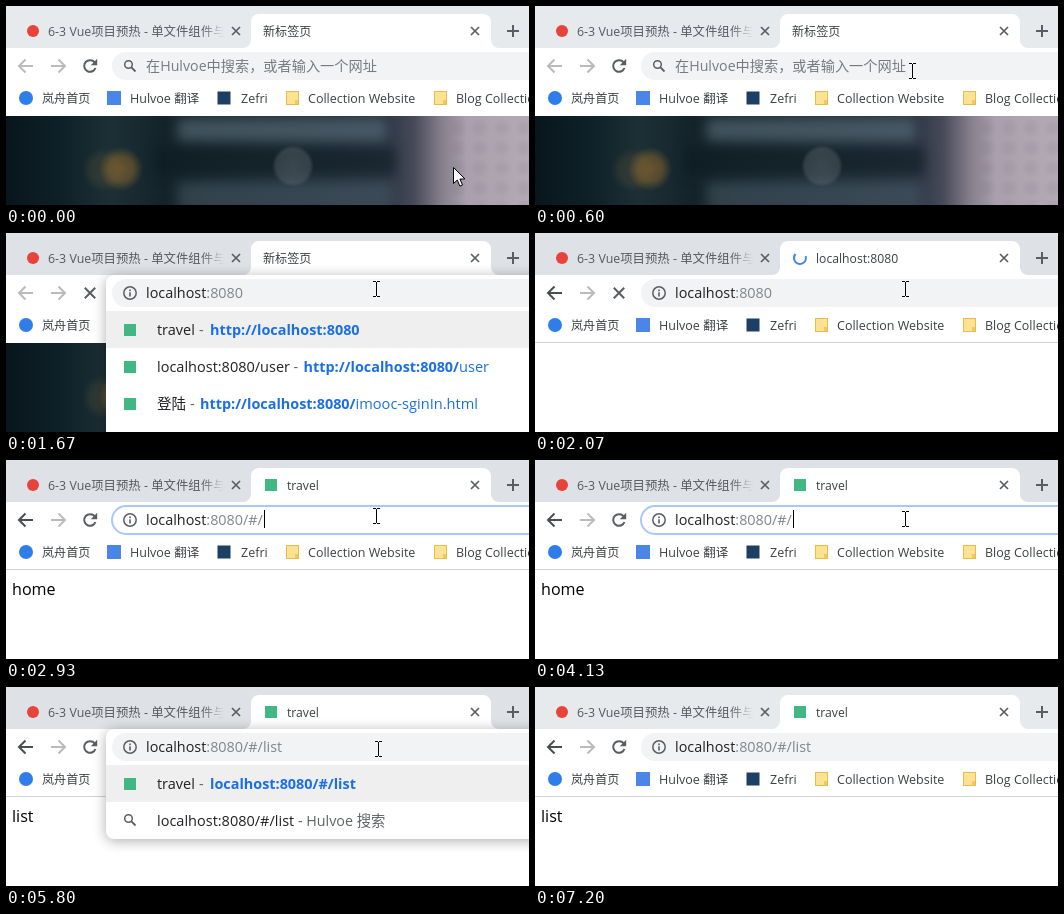
Recreate the animation shown at these times as an HTML page with a canvas. Size 523x199 px, loop 7.39 s.

```html
<!DOCTYPE html>
<html lang="zh">
<head>
<meta charset="utf-8">
<title>Browser tab</title>
<style>
html, body { margin: 0; width: 100%; height: 100%; overflow: hidden; background: #fff; }
canvas { display: block; width: 523px; height: 199px; }
</style>
</head>
<body>
<canvas id="stage"></canvas>
<script>
const W = 523, H = 199, LOOP = 7390, FPS = 15;
const FONT = '"Open Sans", "Noto Sans CJK SC", "Noto Sans CJK", sans-serif';
const INK = '#202124', GREY = '#80868b', ICON = '#5a5e63', BLUE = '#1a6fe8', GREEN = '#41b883';
const BASE = 'localhost:8080';

const canvas = document.getElementById('stage');
const g = canvas.getContext('2d');
const dpr = window.devicePixelRatio || 1;
canvas.width = W * dpr;
canvas.height = H * dpr;

function text(str, x, y, size, color, bold) {
  g.font = (bold ? 'bold ' : '') + size + 'px ' + FONT;
  g.fillStyle = color;
  g.fillText(str, x, y);
  return x + g.measureText(str).width;
}

function rect(x, y, w, h, color) {
  g.fillStyle = color;
  g.fillRect(x, y, w, h);
}

function disc(x, y, r, color) {
  g.fillStyle = color;
  g.beginPath();
  g.arc(x, y, r, 0, Math.PI * 2);
  g.fill();
}

function square(x, y, size, color) {
  rect(x - size / 2, y - size / 2, size, size, color);
}

function lines(color, width, ...paths) {
  g.strokeStyle = color;
  g.lineWidth = width;
  g.beginPath();
  for (const p of paths) {
    g.moveTo(p[0], p[1]);
    for (let i = 2; i < p.length; i += 2) g.lineTo(p[i], p[i + 1]);
  }
  g.stroke();
}

function arc(x, y, r, from, to, color, width) {
  g.strokeStyle = color;
  g.lineWidth = width;
  g.beginPath();
  g.arc(x, y, r, from, to);
  g.stroke();
}

function cross(x, y, r, width) {
  lines(ICON, width, [x - r, y - r, x + r, y + r], [x - r, y + r, x + r, y - r]);
}

function glow(x, y, r, rgb, alpha, core) {
  const grad = g.createRadialGradient(x, y, 0, x, y, r);
  grad.addColorStop(0, `rgba(${rgb},${alpha})`);
  grad.addColorStop(core, `rgba(${rgb},${alpha * 0.8})`);
  grad.addColorStop(1, `rgba(${rgb},0)`);
  g.fillStyle = grad;
  g.fillRect(x - r, y - r, 2 * r, 2 * r);
}

function arrow(x, y, dir, color) {
  lines(color, 2, [x - 7 * dir, y, x + 6 * dir, y],
    [x + 0.5 * dir, y - 6.5, x + 7 * dir, y, x + 0.5 * dir, y + 6.5]);
}

function reload(x, y) {
  arc(x, y, 5.8, 0.35, Math.PI * 1.78, ICON, 2);
  g.fillStyle = ICON;
  g.beginPath();
  g.moveTo(x + 7.2, y - 7.2);
  g.lineTo(x + 7.2, y - 0.8);
  g.lineTo(x + 0.8, y - 0.8);
  g.fill();
}

function magnifier(x, y) {
  arc(x - 1.5, y - 1.5, 3.8, 0, Math.PI * 2, ICON, 1.5);
  lines(ICON, 1.8, [x + 1.2, y + 1.2, x + 5.5, y + 5.5]);
}

function info(x, y) {
  arc(x, y, 6.2, 0, Math.PI * 2, ICON, 1.5);
  rect(x - 0.8, y - 3.5, 1.6, 1.7, ICON);
  rect(x - 0.8, y - 0.7, 1.6, 4.2, ICON);
}

function folder(x) {
  rect(x, 85, 13, 14, '#e6bd4a');
  rect(x + 1, 86, 11, 12, '#fde293');
  rect(x + 9, 94, 3, 4, '#efca62');
}

function photo() {
  g.save();
  g.beginPath();
  g.rect(0, 110, W, H - 110);
  g.clip();

  const base = g.createLinearGradient(0, 0, W, 0);
  const stops = [[0, '#08161c'], [0.1, '#0e2027'], [0.2, '#1d3036'], [0.3, '#14232a'],
    [0.38, '#1b2a32'], [0.6, '#25333e'], [0.73, '#2d3845'], [0.78, '#474a58'],
    [0.83, '#827c89'], [0.88, '#aaa0ad'], [1, '#b4aab6']];
  for (const [at, color] of stops) base.addColorStop(at, color);
  g.fillStyle = base;
  g.fillRect(0, 110, W, H - 110);

  // soft bars: light above and below a dark beam
  g.filter = `blur(${6 * dpr}px)`;
  rect(172, 113, 208, 22, 'rgba(92,110,122,.6)');
  rect(172, 176, 214, 30, 'rgba(80,98,110,.45)');
  rect(150, 142, 240, 26, 'rgba(12,24,32,.55)');
  g.filter = 'none';

  glow(98, 164, 22, '105,90,50', 0.3, 0.6);
  glow(115, 163, 22, '150,108,45', 0.6, 0.55);
  glow(287, 160, 21, '105,115,122', 0.45, 0.8);
  for (let x = 452; x < 540; x += 22)
    for (let y = 122; y < 210; y += 20) glow(x, y, 10, '105,92,112', 0.12, 0.4);
  g.restore();
}

function page(k) {
  if (k < 30) return photo();
  rect(0, 109, W, 1, '#cfd1d4');
  if (k >= 33) text(k < 87 ? 'home' : 'list', 6, 135, 16.1, '#000');
}

function tabs(k) {
  const strip = k >= 10 && k < 108 ? '#dee1e6' : '#e7eaed';
  rect(0, 0, W, 42, strip);
  g.fillStyle = '#fff';
  g.beginPath();
  g.moveTo(237, 42);
  g.arcTo(245, 42, 245, 34, 8);
  g.arcTo(245, 8, 253, 8, 8);
  g.arcTo(485, 8, 485, 16, 8);
  g.arcTo(485, 42, 493, 42, 8);
  g.lineTo(493, 42);
  g.fill();

  disc(27, 25, 6, '#e8433b');
  const fade = g.createLinearGradient(196, 0, 218, 0);
  fade.addColorStop(0, '#55595e');
  fade.addColorStop(1, strip);
  g.save();
  g.beginPath();
  g.rect(40, 10, 178, 30);
  g.clip();
  text('6-3 Vue项目预热 - 单文件组件与', 42, 29.5, 12.4, fade);
  g.restore();
  cross(230, 25, 4, 1.7);
  cross(469, 25, 4, 1.7);
  lines(ICON, 2, [501, 25, 513, 25], [507, 19, 507, 31]);

  if (k < 26) {
    text('新标签页', 257, 29.5, 12.1, '#3c4043');
  } else if (k < 35) {
    arc(265, 25, 6, k * 0.8, k * 0.8 + 4.2, '#4285f4', 2);
    text(BASE, 281, 29.5, 12.2, '#3c4043');
  } else {
    square(265, 25, 12, GREEN);
    text('travel', 281, 29.5, 12.2, '#3c4043');
  }
}

function bookmarks() {
  const label = (str, x, size) => text(str, x, 97, size, '#3c4043');
  disc(20, 92, 7, '#2f7de9');
  label('岚舟首页', 36, 12.1);
  square(108, 92, 14, '#4a86e8');
  label('Hulvoe 翻译', 124, 12.5);
  square(218, 92, 13, '#1d3f63');
  label('Zefri', 235, 12.5);
  folder(280);
  label('Collection Website', 302, 12.5);
  folder(428);
  label('Blog Collection', 450, 12.5);
}

function pill(focused) {
  g.beginPath();
  g.roundRect(106, 46, W, 28, 14);
  g.fillStyle = focused ? '#fff' : '#f1f3f4';
  g.fill();
  if (focused) {
    g.strokeStyle = '#a9c8f7';
    g.lineWidth = 2;
    g.stroke();
  }
}

// sel is a [from, to] range of characters
function address(str, plain, sel) {
  const draw = (a, b) => {
    const x = text(str.slice(0, 9), 140, 65, 14.4, a);
    text(str.slice(9), x, 65, 14.4, b);
  };
  draw(INK, plain ? INK : GREY);
  if (!sel) return;
  const [from, to] = sel.map(n => 140 + g.measureText(str.slice(0, n)).width);
  rect(from, 50, to - from, 20, '#0078d7');
  g.save();
  g.beginPath();
  g.rect(from, 50, to - from, 20);
  g.clip();
  draw('#fff', '#fff');
  g.restore();
}

function popup(bottom) {
  g.save();
  g.shadowColor = 'rgba(0,0,0,.32)';
  g.shadowBlur = 13 * dpr;
  g.shadowOffsetY = 2 * dpr;
  g.fillStyle = '#fff';
  g.beginPath();
  g.roundRect(100, 42, W, bottom - 42, 8);
  g.fill();
  g.restore();
  rect(100, 78, W, 37, '#efefef');
}

function row(y, name, dashX, linkX, bold, rest) {
  text(name, 151, y, 14.5, INK);
  text('-', dashX, y, 14.5, '#5f6368');
  const x = text(bold, linkX, y, 14.4, BLUE, true);
  if (rest) text(rest, x, y, 14.6, BLUE);
}

function hostPopup() {
  popup(230);
  for (const y of [97, 134, 171]) square(124, y, 12, GREEN);
  const link = 'http://' + BASE;
  row(102, 'travel', 193, 204, link);
  row(139, BASE + '/user', 287.5, 297.5, link + '/', 'user');
  row(176, '登陆', 184, 194, link + '/', 'imooc-sginIn.html');
}

function listPopup(typed) {
  popup(152);
  square(124, 97, 12, GREEN);
  row(102, 'travel', 193, 204, BASE + '/#/list');
  magnifier(124, 133);
  const x = text(BASE + '/#/' + typed, 151, 139, 14.5, INK);
  text(' - Hulvoe 搜索', x, 139, 14.3, '#5f6368');
}

function omnibox(k) {
  const home = BASE + '/#/', list = home + 'list';
  const caret = x => rect(x, 50, 1, 18, '#000');
  if (k < 10) {
    pill(false);
    magnifier(124, 60);
    text('在Hulvoe中搜索，或者输入一个网址', 140, 65, 14.2, '#777b80');
  } else if (k < 21) {
    pill(true);
    magnifier(124, 60);
    if (k < 18) caret(140);
  } else if (k < 26) {
    hostPopup();
    if (k === 25) pill(false);
    info(124, 60);
    address(BASE, k < 25, k < 25 && [k - 20, BASE.length]);
  } else if (k < 44) {
    pill(false);
    info(124, 60);
    address(k < 33 ? BASE : home);
  } else if (k < 75) {
    pill(true);
    info(124, 60);
    const sel = k < 46 ? null : k < 51 ? [0, 17] : k < 62 ? [14, 17] : null;
    address(home, false, sel);
    if (k < 46 || (k >= 62 && k < 71)) caret(258);
  } else if (k < 88) {
    const n = k < 77 ? 1 : k < 78 ? 2 : k < 81 ? 3 : 4;
    listPopup('list'.slice(0, n));
    if (k >= 85) pill(false);
    info(124, 60);
    address(list, k < 85, n < 4 && [17 + n, 21]);
    if (n === 4 && k < 85) caret(276);
  } else {
    pill(k < 89);
    info(124, 60);
    address(list);
  }
}

function pointer(x, y) {
  const pts = [0, 0, 0, 16, 3.8, 12.6, 6.4, 18.6, 9, 17.5, 6.4, 11.6, 11.4, 11.4];
  g.beginPath();
  for (let i = 0; i < pts.length; i += 2) g.lineTo(x + pts[i], y + pts[i + 1]);
  g.closePath();
  g.fillStyle = '#fff';
  g.fill();
  g.strokeStyle = '#000';
  g.lineWidth = 1;
  g.stroke();
}

function beam(x, y) {
  const bars = [[x - 3, y - 8, 3, 1], [x + 1, y - 8, 3, 1], [x, y - 7, 1, 14],
    [x - 3, y + 7, 3, 1], [x + 1, y + 7, 3, 1]];
  for (const [bx, by, w, h] of bars) rect(bx - 0.5, by - 0.5, w + 1, h + 1, 'rgba(255,255,255,.8)');
  for (const [bx, by, w, h] of bars) rect(bx, by, w, h, '#000');
}

function cursor(k) {
  const mix = (a, b, p) => Math.round(a + (b - a) * p);
  if (k < 11) {
    const p = k / 11, e = p * p * (3 - 2 * p);
    const x = mix(447, 370, e), y = mix(161, 56, e);
    if (y < 76) beam(x, y); else pointer(x + 0.5, y + 0.5);
  } else if (k < 62) beam(370, 56);
  else if (k < 63) beam(370, 59);
  else if (k < 81) beam(370, 60);
  else if (k < 98) beam(372, 62);
  else if (k < 102) {
    const p = Math.pow((k - 97) / 4, 1.3);
    pointer(mix(372, 91, p) + 0.5, mix(62, 182, p) + 0.5);
  }
}

function draw(t) {
  const k = Math.floor(t * FPS / 1000 + 0.06);
  g.setTransform(dpr, 0, 0, dpr, 0, 0);
  rect(0, 0, W, H, '#fff');
  page(k);
  tabs(k);
  arrow(20, 60, -1, k < 30 ? '#b9bbbe' : '#4a4d51');
  arrow(52, 60, 1, '#b9bbbe');
  if (k >= 25 && k < 35) cross(84, 60, 5.2, 2);
  else reload(84, 60);
  bookmarks();
  omnibox(k);
  cursor(k);
}

const start = performance.now();
function tick(now) {
  draw(Math.max(0, now - start) % LOOP);
  requestAnimationFrame(tick);
}
draw(0);
requestAnimationFrame(tick);
</script>
</body>
</html>
```
